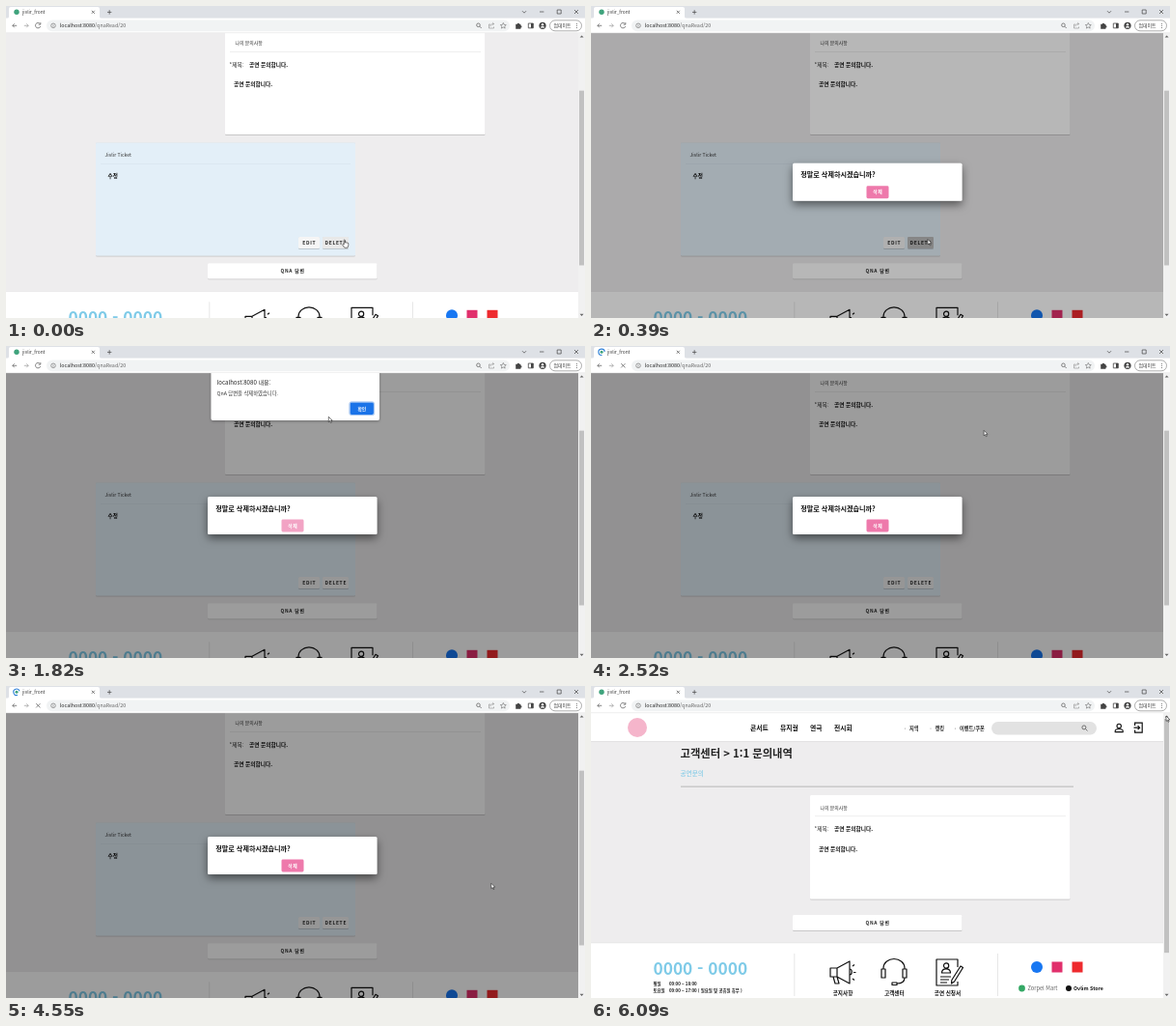
Write an HTML page that moves like this. It is 600 px wide and 323 px high and loops after 6.12 s.

```html
<!DOCTYPE html>
<html lang="ko">
<head>
<meta charset="utf-8">
<style>
html, body { margin: 0; width: 100%; height: 100%; overflow: hidden; background: #fff; }
svg { display: block; width: 600px; height: 323px; }
text { font-family: "Noto Sans CJK KR", "Noto Sans", sans-serif; white-space: pre; }
</style>
</head>
<body>
<svg id="stage" viewBox="0 0 600 323" xmlns="http://www.w3.org/2000/svg"></svg>
<script>
const LOOP = 6120;
const VIEW = { top: 28, height: 295 };
const OPEN = 290, ALERT_ON = 1350, ALERT_OFF = 2200, RELOADED = 4800;
const REPLY_SHIFT = 116.8;
const SCRIM = .39;

// Markup helpers; text is placed by its vertical centre.
const attrs = o => Object.entries(o).map(([k, v]) => ` ${k}="${v}"`).join('');
const rect = (x, y, w, h, fill, o = {}) =>
  `<rect x="${x}" y="${y}" width="${w}" height="${h}" fill="${fill}"${attrs(o)}/>`;
const dot = (x, y, r, fill, o = {}) => `<circle cx="${x}" cy="${y}" r="${r}" fill="${fill}"${attrs(o)}/>`;
const line = (d, color = '#555', width = .8, o = {}) =>
  `<path d="${d}" fill="none" stroke="${color}" stroke-width="${width}"${attrs(o)}/>`;
const text = (s, x, y, size, fill = '#222', weight = 400, o = {}) =>
  `<text x="${x}" y="${y + size * .36}" font-size="${size}" fill="${fill}" font-weight="${weight}"${attrs(o)}>${s}</text>`;
const group = (id, content, o = {}) => `<g id="${id}"${attrs(o)}>${content}</g>`;
const middle = { 'text-anchor': 'middle' };
const raised = { rx: 1.2, filter: 'url(#low)' };

const shadow = (id, dy, blur, alpha) =>
  `<filter id="${id}" x="-30%" y="-60%" width="160%" height="240%"><feDropShadow dx="0" dy="${dy}" stdDeviation="${blur}" flood-opacity="${alpha}"/></filter>`;

const defs = `<defs>${shadow('low', .5, .7, .32)}${shadow('high', 4, 5, .5)}${shadow('popup', 1, 1.6, .3)}
  <clipPath id="view"><rect x="0" y="28" width="593" height="295"/></clipPath></defs>`;

const magnifier = (x, y, color, s = 1) =>
  line(`M${x + s} ${y + s}l${2 * s} ${2 * s}M${x + 1.4 * s} ${y - .6 * s}a${2 * s} ${2 * s} 0 1 1 ${-4 * s} 0a${2 * s} ${2 * s} 0 1 1 ${4 * s} 0`, color, .8 * s);

const header = () => {
  const menu = [['콘서트', 165], ['뮤지컬', 196], ['연극', 227], ['전시회', 252]];
  const links = [['지역', 330], ['랭킹', 356.5], ['이벤트/쿠폰', 382]];
  return rect(0, 28, 593, 29, '#fff') + rect(0, 57, 593, .6, '#ddd')
    + dot(48, 43, 10, '#f5b5cb')
    + menu.map(([s, x]) => text(s, x, 44, 6.8, '#111', 700)).join('')
    + links.map(([s, x]) => dot(x - 4.5, 44, .6, '#999') + text(s, x, 44, 5.2, '#222', 700)).join('')
    + rect(415, 37, 109, 13.5, '#e2e2e2', { rx: 6.7 }) + magnifier(511.5, 43.5, '#555')
    + line('M549.4 41.4a2.2 2.2 0 1 1-4.4 0a2.2 2.2 0 1 1 4.4 0M543.2 47.6v-1c0-2.8 8-2.8 8 0v1z', '#111', 1.1)
    + line('M563.6 41v-2.8h7.6v10h-7.6v-2.8M562.5 43.2h6M566.6 41.2l2 2l-2 2', '#111', 1.2);
};

const question = () =>
  text('고객센터 &gt; 1:1 문의내역', 92.5, 70, 11.3, '#222', 700)
  + text('공연문의', 92.5, 91, 6.6, '#6cc4e6')
  + rect(93, 103.7, 407, .8, '#aaa')
  + rect(227, 113, 269.5, 107.5, '#fff', raised)
  + text('나의 문의사항', 237.5, 126, 4.9, '#333')
  + rect(232, 134.6, 260, .5, '#ddd')
  + text('*제목:', 231.5, 148, 5.7, '#222')
  + text('공연 문의합니다.', 252, 148, 5.7, '#111', 700)
  + text('공연 문의합니다.', 236, 168.5, 5.7, '#111', 700);

const button = (label, x, y, w, h, fill = '#f5f5f5') =>
  rect(x, y, w, h, fill, raised)
  + text(label, x + w / 2 + .3, y + h / 2, 4.9, '#222', 700, { ...middle, 'letter-spacing': .7 });

const reply = () =>
  rect(93, 229, 269, 117, '#e3eff8', raised)
  + text('Jivlir Ticket', 102.5, 242, 5.1, '#333')
  + rect(98, 250.6, 259, .5, '#d3dfe8')
  + text('수정', 105.5, 263.5, 5.6, '#111', 700)
  + button('EDIT', 303, 326.5, 22, 12)
  + button('DELETE', 328, 326.5, 27, 12)
  + rect(328, 326.5, 27, 12, '#000', { id: 'pressed', rx: 1.2 });

const megaphone = 'M248 292h7v9h-7zM255 292l13-7v23l-13-7M251 301l2 7h4l-2-7M268 293c3 0 3 6 0 6M271 290l2-1.5M272 296.5h2.5M271 303l2 1.5';
const headset = 'M303 293v-1a11 9.5 0 0 1 22 0v1M301 293h4v9h-4zM323 293h4v9h-4zM325 302c0 4-3 6-8 6M312 307h5v2.5h-5z';
const form = 'M380 291v-8h-22v27h22v-4M365.5 289.5a2.6 2.6 0 1 1 5.2 0a2.6 2.6 0 1 1-5.2 0M363.5 297c0-5.5 9-5.5 9 0zM362 301h11M362 304h9M362 307h7M383 290l2.5 1.5l-9 14.5l-3 2l.3-3.5z';

const footer = () => {
  const icons = [[megaphone, '공지사항', 261], [headset, '고객센터', 314.3], [form, '공연 신청서', 369.5]];
  return rect(0, 266, 593, 66.5, '#fff') + rect(0, 265.7, 593, .5, '#ddd')
    + text('0000 - 0000', 64.5, 293, 17.3, '#7fcbe8', 700)
    + text('평일', 64.5, 308.5, 4.4, '#111', 700) + text('09:00 ~ 18:00', 81, 308.5, 4.4, '#111', 700)
    + text('토요일', 64.5, 315.5, 4.4, '#111', 700)
    + text('09:00 ~ 17:00 ( 일요일 및 공휴일 휴무 )', 81, 315.5, 4.4, '#111', 700)
    + rect(210.5, 277, .7, 44, '#ddd') + rect(421, 277, .7, 44, '#ddd')
    + icons.map(([d, s, x]) => line(d, '#111', 1.2, { 'stroke-linejoin': 'round' })
      + text(s, x, 318, 5.6, '#111', 700, middle)).join('')
    + dot(462, 291, 6, '#1877f2') + rect(477.5, 285.5, 11, 11, '#e1306c')
    + rect(498.5, 285.5, 11, 11, '#ee2a2e')
    + dot(446.5, 313, 3.4, '#34a865') + text('Zorpel Mart', 452.5, 313, 5.7, '#666')
    + dot(495, 313, 3, '#111') + text('Ovlim Store', 500, 313, 5.3, '#111', 700)
    + rect(0, 332.5, 593, 45, '#ebebeb')
    + dot(228, 351, 5, '#f5b5cb')
    + text('copyright Jivlir corp. @2022 All rights reserved', 245.5, 352.5, 5.4, '#333', 700);
};

const dialog = () =>
  rect(209, 156, 175.5, 39, '#fff', { rx: 1.5, filter: 'url(#high)' })
  + text('정말로 삭제하시겠습니까?', 217.3, 168, 7.1, '#111', 700)
  + rect(285.5, 179.5, 23, 13, '#ee79ab', { rx: 1.4, id: 'confirm' })
  + text('삭제', 297.3, 186, 4.9, '#fff', 700, { ...middle, 'letter-spacing': .5 });

const alertBox = () =>
  rect(212.5, 24, 174.5, 53, '#fff', { rx: 2, filter: 'url(#popup)' })
  + text('localhost:8080 내용:', 218.5, 38, 6.1, '#222')
  + text('QnA 답변을 삭제하였습니다.', 218.5, 48.8, 5.3, '#333')
  + rect(355.9, 57.9, 25.7, 13.7, '#fff', { rx: 2, stroke: '#7aa9e8', 'stroke-width': .7 })
  + rect(356.6, 58.6, 24.3, 12.3, '#1a73e8', { rx: 1.4 })
  + text('확인', 368.8, 64.8, 4.8, '#fff', 700, middle);

const browser = () =>
  rect(0, 0, 600, 13, '#dee1e6')
  + `<path d="M1 13q2 0 2-2V3q0-2 2-2h90q2 0 2 2v8q0 2 2 2z" fill="#fff"/>`
  + rect(0, 12.6, 600, 15.4, '#fff') + rect(0, 27.6, 600, .5, '#ddd')
  + dot(11, 6.3, 2.7, '#3fa37c', { id: 'favicon' })
  + line('M11 3.1a3.2 3.2 0 1 1-3.2 3.2', '#2f80d8', 1.1, { id: 'spinner' })
  + text('jivlir_front', 17, 6.4, 4.8, '#333')
  + line('M88.8 4.8l3 3m0-3l-3 3M105 6.4h4.4M107.2 4.2v4.4M535 5.2l2 2l2-2M553 6h4.4M571.2 4h4v4h-4zM589 4l4 4m0-4l-4 4', '#444', .7)
  + line('M11.2 20.3H6.8m2-2l-2 2l2 2', '#555', .7)
  + line('M18.8 20.3h4.4m-2-2l2 2l-2 2', '#999', .7)
  + line('M35.2 18.4a2.7 2.7 0 1 0 .5 2.6M35.8 17v2.2h-2.2', '#555', .7, { id: 'reload' })
  + line('M31.2 18.2l4.2 4.2m0-4.2l-4.2 4.2', '#555', .7, { id: 'stop' })
  + rect(42, 14.4, 480, 11.8, '#f1f3f4', { rx: 5.9 })
  + line('M51.3 20.3a2.3 2.3 0 1 1-4.6 0a2.3 2.3 0 1 1 4.6 0M49 20v1.5M49 18.8v.6', '#666', .6)
  + text('localhost:8080<tspan fill="#666">/qnaRead/20</tspan>', 55.8, 20.2, 5.35, '#222')
  + magnifier(490, 20.3, '#555', .9)
  + line('M502 19h-1.5v4h5v-1.5M502 21.3c0-2 1-2.8 3.5-2.8m-1.3-1.4l1.5 1.4l-1.5 1.4', '#777', .5)
  + line('M515.3 17.4l.9 2l2.1.2l-1.6 1.4l.5 2.1l-1.9-1.1l-1.9 1.1l.5-2.1l-1.6-1.4l2.1-.2z', '#555', .5)
  + `<path d="M528.2 18.8h1.6a1.1 1.1 0 0 1 2.2 0h1.4v1.5a1.1 1.1 0 0 1 0 2.2v1.2h-5.2z" fill="#444"/>`
  + line('M541.3 18h5v4.8h-5z', '#444') + rect(544, 18, 2.3, 4.8, '#444')
  + dot(556, 20.3, 3.6, '#444') + dot(556, 19.2, 1.2, '#fff') + `<path d="M553.8 22.4c0-2 4.4-2 4.4 0z" fill="#fff"/>`
  + rect(563.5, 14.8, 33, 11, '#fff', { rx: 5.5, stroke: '#777', 'stroke-width': .6, id: 'update' })
  + text('업데이트', 567.5, 20.2, 4.9, '#333')
  + [18.2, 20.3, 22.4].map(y => dot(591.5, y, .5, '#555')).join('');

const scrollbar = () =>
  rect(593, 28, 7, 295, '#f1f1f1')
  + '<path d="M594.6 32.6l2-2.2l2 2.2zM594.6 318.8l2 2.2l2-2.2z" fill="#666"/>'
  + rect(594, 34, 5, 100, '#c1c1c1', { id: 'thumb' });

const pointerStyle = { fill: '#fff', stroke: '#222', 'stroke-width': .6, 'stroke-linejoin': 'round' };
const pointer = () =>
  `<path id="arrow" d="M0 0v5.4l1.3-1.1l.9 2l.9-.4l-.9-2h1.7z"${attrs(pointerStyle)}/>`
  + `<path id="hand" d="M-.6 4.6V.6q.6-1 1.2 0v2.6q2-.4 3.4.6v2.4l-.8 2.2h-3.2l-2.2-3q.4-1.2 1.6-.2z"${attrs(pointerStyle)}/>`;

const stage = document.getElementById('stage');
stage.innerHTML = defs
  + group('viewport', rect(0, 28, 593, 295, '#eeedee')
    + group('page', header() + question() + group('reply', reply())
      + group('lower', button('QNA 답변', 209, 237, 175.5, 16, '#fff') + footer()))
    + rect(0, 28, 593, 295, '#000', { id: 'scrim' })
    + group('dialog', dialog()), { 'clip-path': 'url(#view)' })
  + scrollbar() + browser()
  + group('alert', alertBox(), { 'clip-path': 'inset(4px -10px -10px -10px)' })
  + group('pointer', pointer());

const parts = Object.fromEntries([...stage.querySelectorAll('[id]')].map(e => [e.id, e]));
const set = (id, name, value) => parts[id].setAttribute(name, value);
const show = (id, on) => set(id, 'visibility', on ? 'visible' : 'hidden');
const move = (id, x, y) => set(id, 'transform', `translate(${x} ${y})`);

const clamp = v => Math.min(1, Math.max(0, v));
const smooth = v => v * v * (3 - 2 * v);

function bezier(x1, y1, x2, y2) {
  const at = (a, b, s) => 3 * (1 - s) ** 2 * s * a + 3 * (1 - s) * s * s * b + s ** 3;
  return x => {
    let lo = 0, hi = 1;
    for (let i = 0; i < 24; i++) {
      const mid = (lo + hi) / 2;
      if (at(x1, x2, mid) < x) lo = mid; else hi = mid;
    }
    return at(y1, y2, lo);
  };
}
const slideEase = bezier(.25, .8, .25, 1);
const fadeEase = bezier(.25, .8, .5, 1);

// time, x, y of the pointer tip
const path = [
  [0, 350.8, 241.8], [390, 349, 241.5], [520, 349, 241.5], [880, 297, 186], [1380, 297, 186],
  [1820, 334.3, 73.2], [2010, 368, 64], [2250, 368, 64], [3100, 531, 161.5], [3250, 531, 161.5],
  [3900, 502.8, 204.3], [5300, 502.8, 204.3], [5600, 596, 31], [LOOP, 596, 31]
];
function pointerAt(t) {
  const i = path.findIndex(k => k[0] > t);
  const [t0, x0, y0] = path[i - 1], [t1, x1, y1] = path[i];
  const p = smooth((t - t0) / (t1 - t0));
  return [x0 + (x1 - x0) * p, y0 + (y1 - y0) * p];
}

function render(t) {
  const reloaded = t >= RELOADED;
  const scroll = reloaded ? 48.5 * (1 - smooth(clamp((t - 5610) / 260))) : 87.5;
  const pageHeight = reloaded ? 343.5 : 460;
  move('page', 0, -scroll);
  move('lower', 0, reloaded ? 0 : REPLY_SHIFT);
  show('reply', !reloaded);
  set('thumb', 'y', 34 + scroll / pageHeight * 282);
  set('thumb', 'height', VIEW.height / pageHeight * 282);

  const opened = clamp((t - OPEN) / 300);
  const modal = t >= OPEN && !reloaded;
  show('scrim', modal);
  set('scrim', 'opacity', SCRIM * fadeEase(opened));
  show('dialog', modal);
  move('dialog', 0, 39 * (1 - slideEase(opened)));
  set('pressed', 'opacity', t < 180 ? .05 : t < 1050 ? .24 : 0);
  set('confirm', 'fill', t > 1050 && t < ALERT_OFF ? '#f2a3c4' : '#ee79ab');
  show('alert', t >= ALERT_ON && t < ALERT_OFF);

  const loading = t >= ALERT_OFF && !reloaded;
  show('spinner', loading);
  set('spinner', 'transform', `rotate(${-t * .36} 11 6.3)`);
  set('favicon', 'r', loading ? 1.5 : 2.7);
  show('reload', !loading);
  show('stop', loading);

  move('pointer', ...pointerAt(t));
  const hand = t < OPEN || (t > 830 && t < ALERT_ON);
  show('hand', hand);
  show('arrow', !hand);
}

const start = performance.now();
function tick() {
  render((performance.now() - start) % LOOP);
  requestAnimationFrame(tick);
}
tick();
</script>
</body>
</html>
```
